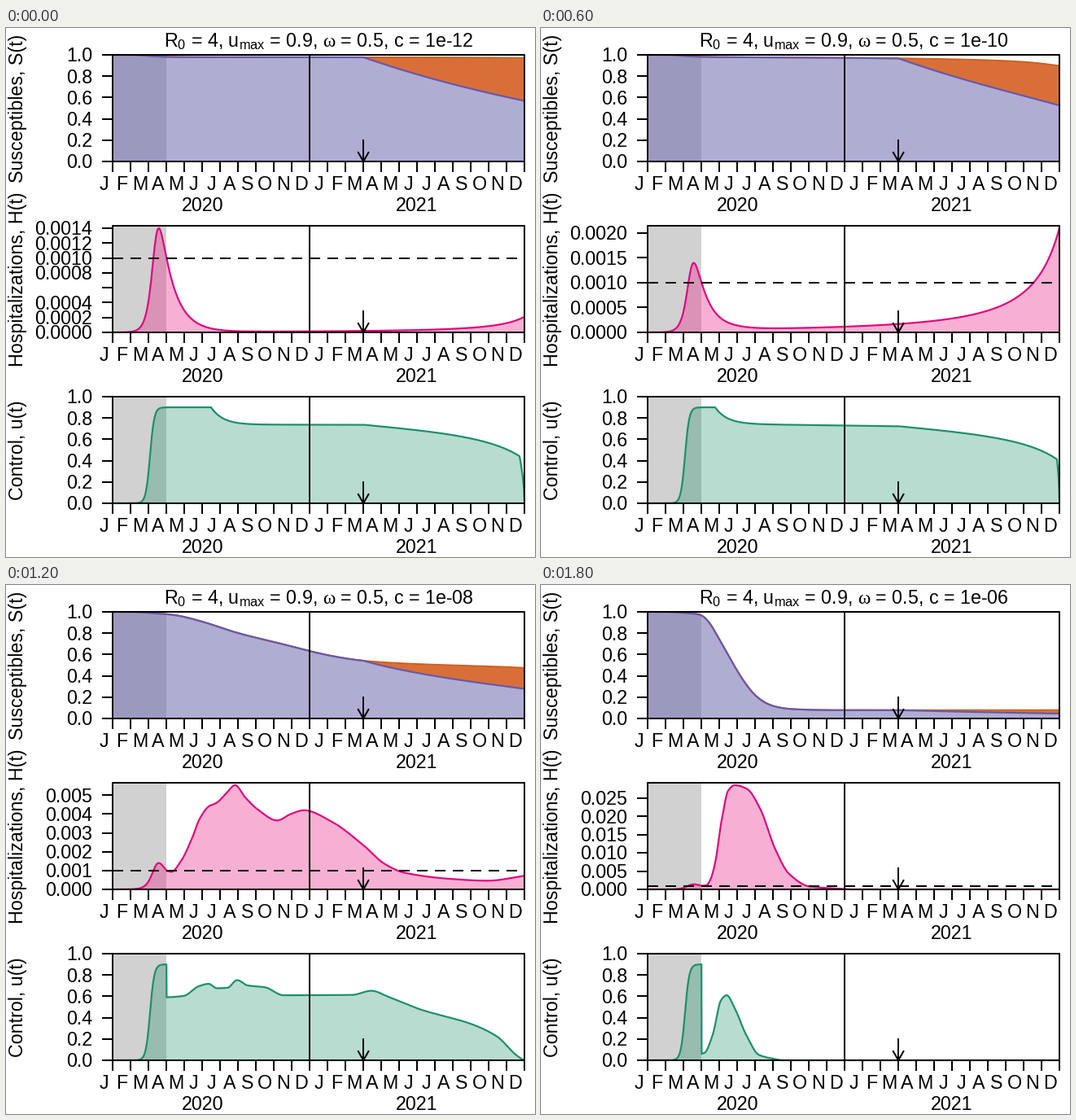
A matplotlib script that plays this animation: 650 px wide and 650 px high, repeating every 2100 ms.

```python
import matplotlib.pyplot as plt
import numpy as np
from matplotlib.animation import FuncAnimation

SIZE, DPI = 650, 100
PX = 72 / DPI                       # points per pixel
LEFT, MONTH, HEIGHT = 131.4, 21.98, 131
RIGHT = LEFT + 23 * MONTH
YEAR, VACC, LOCK = LEFT + 11 * MONTH, LEFT + 14 * MONTH, LEFT + 3 * MONTH
S_BASE, H_BASE, U_BASE = BASES = [164 + 210 * i for i in range(3)]
PURPLE, ORANGE, PINK, GREEN = "#7570b3", "#d96f38", "#e7298a", "#1c9068"

plt.rcParams.update({
    "font.family": "Liberation Sans", "font.size": 23.3 * PX,
    "mathtext.fontset": "custom", "mathtext.rm": "Liberation Sans",
    "mathtext.it": "Liberation Serif",
})

X = np.arange(LEFT, RIGHT + 0.1, 0.25)


def spline(points, x):
    """Monotone cubic through the points, constant outside them."""
    px, py = np.array(points, float).T
    h = np.diff(px)
    d = np.diff(py) / h
    m = np.concatenate([d[:1], np.zeros(len(d) - 1), d[-1:]])
    same = d[:-1] * d[1:] > 0
    m[1:-1][same] = (2 * d[:-1] * d[1:])[same] / (d[:-1] + d[1:])[same]
    x = np.clip(x, px[0], px[-1])
    i = np.clip(np.searchsorted(px, x, side="right") - 1, 0, len(h) - 1)
    t = (x - px[i]) / h[i]
    return ((1 + 2 * t) * (1 - t) ** 2 * py[i] + t * (1 - t) ** 2 * h[i] * m[i]
            + t * t * (3 - 2 * t) * py[i + 1] - t * t * (1 - t) * h[i] * m[i + 1])


def sigmoid(x, mid, width):
    return 1 / (1 + np.exp((mid - x) / width))


def wave(x):
    """First wave in thousandths: fast growth bent into slow decay."""
    t = x - 187.5
    grow, decay = 4.5 * np.exp(0.185 * t), 1.77 * np.exp(-0.057 * t)
    return (grow ** -1.2 + decay ** -1.2) ** (-1 / 1.2)


def rebound(end, pole, power):
    """First wave, then growth towards a pole beyond the right edge."""
    def hosp(x):
        x = np.minimum(x, RIGHT)
        late = end * ((pole - RIGHT) / (pole - x)) ** power
        return wave(x) + late * sigmoid(x, 225, 8)
    return hosp


def later_waves(*points):
    return lambda x: np.where(x < points[0][0], wave(x), spline(points, x))


def relax(x, cliff):
    """Drop in control while vaccination goes on, and the cut at the end."""
    z = np.maximum(x - VACC, 0)
    cut = np.sqrt(np.clip((RIGHT - x) / (RIGHT - cliff), 0, 1))
    return z / (1360 - 0.0193 * z * z), cut


def hold(until, start, end, cliff):
    def control(x):
        base = np.interp(x, [until, VACC], [start, end])
        drop, cut = relax(x, cliff)
        ease = np.exp(-np.maximum(x - until, 0) / 14.5)
        return (base + (0.9 - start) * ease - drop) * cut
    return control


def steps(*points, cliff=None):
    def control(x):
        u = spline(points, x)
        if cliff:
            drop, cut = relax(x, cliff)
            u = (u - drop) * cut
        return u
    return control


runs = []


def add_run(cost, step, digits, hosp, control):
    infected = np.cumsum(hosp(X + 17)) * 0.25
    total = 1 - 4.8e-4 * infected
    s = total * np.exp(-0.0027 * np.maximum(X - VACC, 0))
    u = np.where(X < LOCK, 0.9 * sigmoid(X, 177, 2.6), control(X))
    runs.append((cost, step, digits, total, s, hosp(X), u))


add_run("1e-12", 0.2, 4, rebound(0.21, 689, 1.5), hold(252, .737, .737, 631))
add_run("1e-11", 0.2, 4, rebound(0.82, 676, 1.5), hold(233.5, .742, .727, 632))
add_run("1e-10", 0.5, 4, rebound(2.1, 695, 1.7), hold(214, .745, .723, 634))
add_run("1e-09", 0.5, 4,
        later_waves((197.5, 1), (206, .83), (222, .98), (250, 1.19),
                    (275, 1.33), (297, 1.13), (322, .98), (340, .92),
                    (355, .75), (373, .41), (400, .27), (439, .33), (500, .57),
                    (555, .87), (595, 1.27), (622, 1.91), (637, 2.67)),
        steps((197, .705), (208, .705), (222, .722), (262, .725), (274, .772),
              (316, .73), (333, .735), (354, .808), (373, .793), (395, .728),
              (439, .69), cliff=622))
add_run("1e-08", 1, 3,
        later_waves((198, .98), (203, .93), (215, 1.5), (228, 2.65),
                    (238, 3.75), (249, 4.4), (259, 4.6), (271, 5.12),
                    (281.5, 5.53), (294, 4.88), (310, 4.22), (333, 3.66),
                    (350, 4), (366, 4.2), (400, 3.6), (439, 2.35), (465, 1.36),
                    (490, .88), (545, .56), (592, .46), (637, .72)),
        steps((197, .59), (218, .603), (237, .695), (249, .717), (259, .676),
              (272, .68), (284, .752), (297, .702), (318, .685), (341, .61),
              (425, .613), (449, .652), (470, .595), (510, .475), (570, .345),
              (603, .225), (626, .055), (636, 0)))
add_run("1e-07", 5, 3,
        later_waves((198, 1), (203, .95), (211, 1.75), (221, 5.1), (231, 11.5),
                    (239, 15.7), (248, 16.9), (257, 15.5), (266, 11.8),
                    (277, 8.6), (294, 7.1), (318, 5.5), (340, 3.95),
                    (352, 3.75), (402, 4.2), (439, 3.4), (480, 1.3),
                    (515, .42), (580, .06)),
        steps((197, .43), (222, .43), (233, .61), (248, .67), (258.5, .82),
              (268, .69), (287, .555), (309, .52), (327, .542), (345, .4),
              (373, .237), (410, .1), (439, .033), (475, 0)))
add_run("1e-06", 5, 3,
        later_waves((198, 1), (203, 1.1), (208, 2.6), (214, 7.3), (222, 19),
                    (230, 27), (238, 28.5), (253, 27.5), (269, 22.2),
                    (288, 10.9), (305, 4.2), (330, .8), (380, 0)),
        steps((197, .06), (201, .07), (211, .24), (221, .56), (228, .61),
              (238, .49), (252, .24), (268, .05), (295, 0)))

fig = plt.figure(figsize=(SIZE / DPI, SIZE / DPI), dpi=DPI, facecolor="white")
ax = fig.add_axes([0, 0, 1, 1])
ax.set_xlim(0, SIZE)
ax.set_ylim(SIZE, 0)
ax.axis("off")


def line(x, y, color="black", width=2, z=4, **kw):
    return ax.plot(x, y, color=color, lw=width * PX, zorder=z, **kw)[0]


def label(x, y, text, **kw):
    return ax.text(x, y, text, **{"ha": "center", "va": "baseline", **kw})


def area(y0, y1, color, alpha=1):
    return ax.fill_between(X, y0, y1, color=color, alpha=alpha, lw=0, zorder=2)


def y_ticks(base, gap, names):
    made = []
    for i, name in enumerate(names):
        y = base - i * gap
        made.append(line([LEFT - 12.5, LEFT], [y, y]))
        made.append(label(106, y + 8.4, name, ha="right"))
    return made


def draw_panel(base, name):
    top = base - HEIGHT
    ax.fill_between([LEFT, LOCK], base, top, color="#d1d1d1", lw=0, zorder=1)
    line([LEFT, RIGHT, RIGHT, LEFT, LEFT], [base, base, top, top, base])
    line([YEAR, YEAR], [base, top])
    line([VACC, VACC], [base - 26, base])
    line([VACC - 6.3, VACC, VACC + 6.3], [base - 11, base, base - 11])
    for i, month in enumerate("JFMAMJJASOND" * 2):
        x = LEFT + i * MONTH
        line([x, x], [base, base + 12])
        label(x - MONTH / 2, base + 35, month)
    for i, year in enumerate(("2020", "2021")):
        label(LEFT + (5 + 12 * i) * MONTH, base + 61.3, year)
    label(21.5, base - HEIGHT / 2, name, rotation=90, rotation_mode="anchor")


for base, name in zip(BASES, ("Susceptibles, S(t)", "Hospitalizations, H(t)",
                              "Control, u(t)")):
    draw_panel(base, name)
for base in (S_BASE, U_BASE):
    y_ticks(base, HEIGHT / 5, [f"{i / 5:.1f}" for i in range(6)])

live = []


def update(n):
    while live:
        live.pop().remove()
    cost, step, digits, total, s, h, u = runs[n]
    scale = (HEIGHT - 3) / h.max()
    gap = step * scale
    names = [f"{i * step / 1000:.{digits}f}" for i in range(int(HEIGHT / gap) + 1)]
    if gap < 20:
        names[3] = ""               # crowded axis drops one label
    y_total, y_s = S_BASE - HEIGHT * total, S_BASE - HEIGHT * s
    y_h, y_u = H_BASE - scale * h, U_BASE - HEIGHT * u
    limit = H_BASE - scale
    live.extend([
        label((LEFT + RIGHT) / 2, 24,
              r"R$_{\mathrm{0}}$ = 4, u$_{\mathrm{max}}$ = 0.9, "
              rf"$\mathit{{\omega}}$ = 0.5, c = {cost}"),
        area(S_BASE, y_s, PURPLE, 0.57),
        area(y_s, y_total, ORANGE),
        line(X, y_total, "#cf5f1c", z=3),
        line(X, y_s, "#6759ab", 2.2, 3),
        area(H_BASE, y_h, PINK, 0.37),
        line(X, y_h, "#e0077f", 2.2, 3),
        line([LEFT, RIGHT], [limit, limit], dashes=(6.5, 4.5),
             dash_capstyle="butt"),
        area(U_BASE, y_u, GREEN, 0.31),
        line(X, y_u, GREEN, 2.2, 3),
        *y_ticks(H_BASE, gap, names),
    ])
    return live


anim = FuncAnimation(fig, update, frames=len(runs), init_func=lambda: live,
                     interval=300, repeat=True, repeat_delay=0, blit=False)
plt.show()
```
